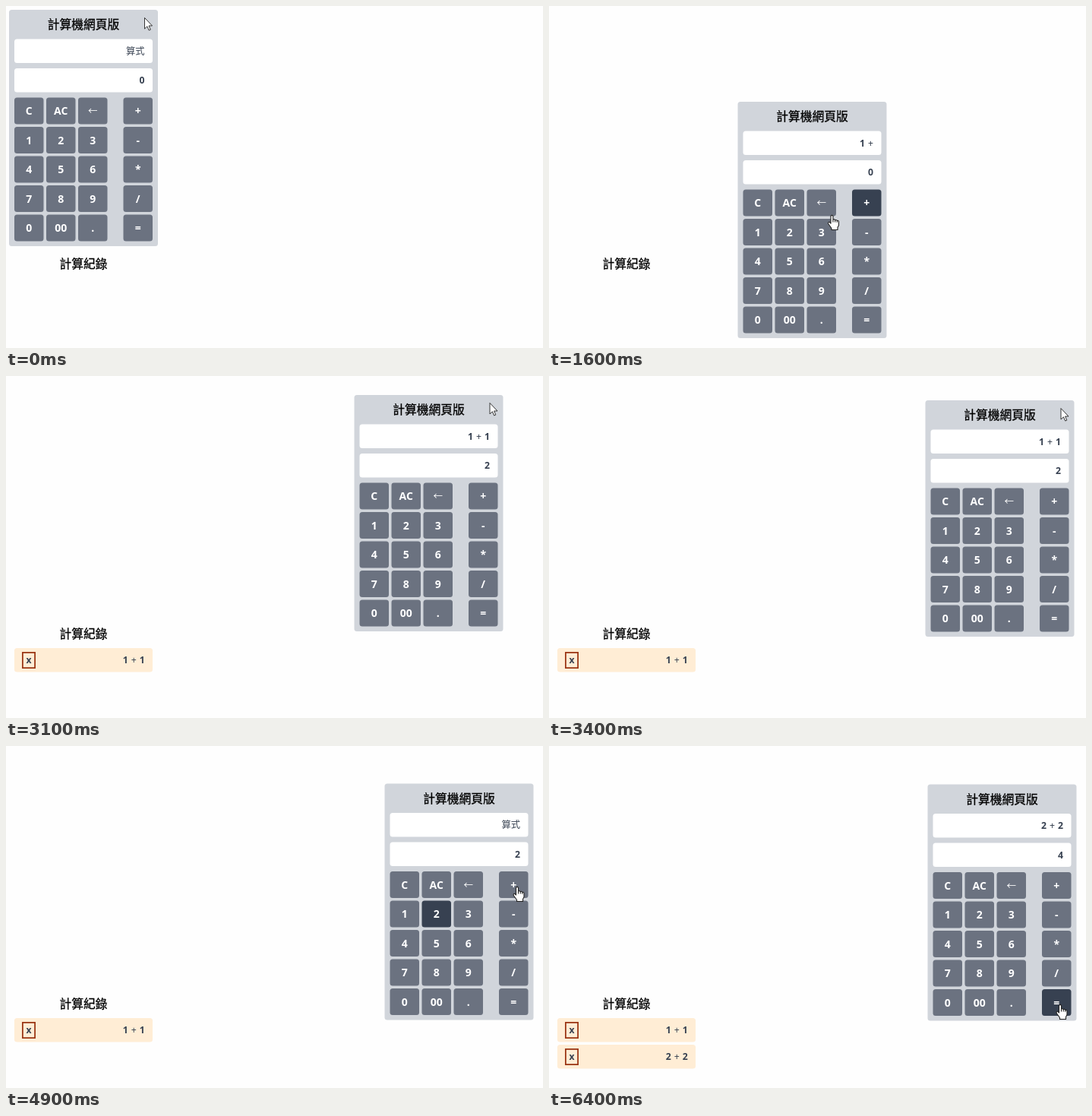
An HTML page for the animation above (6500 ms loop, 707x450 px).

```html
<!DOCTYPE html>
<html lang="zh-Hant">
<head>
<meta charset="utf-8">
<title>計算機</title>
<style>
  html, body { margin: 0; width: 100%; height: 100%; overflow: hidden; background: #fefefe; }
  svg { display: block; }
  text { font: 700 12.25px "Noto Sans", "Noto Sans CJK TC", sans-serif; fill: #374151; }
  .heading {
    font: 400 15.75px "Noto Sans CJK TC", "Noto Sans CJK", sans-serif;
    fill: #000; stroke: #000; stroke-width: .3px; text-anchor: middle;
  }
  .key { fill: #6b7280; }
  .key.focused { fill: #374151; }
  .label { font-size: 14px; fill: #fff; text-anchor: middle; }
  .back { font: 400 12.5px "Noto Sans CJK TC", "Noto Sans CJK", sans-serif; }
  .value { text-anchor: end; word-spacing: .8px; }
  .value .sign, .value .hint { font-weight: 400; }
  .pointer { fill: #fff; stroke: #222; stroke-linejoin: round; }
</style>
</head>
<body>
<svg id="stage" width="707" height="450" viewBox="0 0 707 450"></svg>
<script>
const LOOP = 6500, STEP = 100, TRAVEL = 250;
const KEYS = ['C', 'AC', '←', '+', ...'123-456*789/', '0', '00', '.', '='];
const KEYS_TOP = 115.5;
const GRIP = [178, 10], AIM = [24, 20];

// The panel is dragged to a place, or a key is pressed, at the given time.
const EVENTS = [
  { time: 0, panel: [4, 5] },
  { time: 400, panel: [251, 128] },
  { time: 700, panel: [248.5, 126] },
  { time: 1200, key: '1' },
  { time: 1500, key: '+' },
  { time: 1900, key: '1' },
  { time: 2300, key: '=' },
  { time: 2800 },
  { time: 3100, panel: [458.5, 25] },
  { time: 3250, panel: [490, 0] },
  { time: 3500, panel: [498.5, 49.5] },
  { time: 4000, key: 'AC' },
  { time: 4400, key: '2' },
  { time: 5100, key: '+' },
  { time: 5500, key: '2', panel: [498.5, 50.5] },
  { time: 6000, key: '=' }
];

const add = (...points) => [0, 1].map(axis => points.reduce((sum, point) => sum + point[axis], 0));

function keyPlace(key) {
  const index = KEYS.indexOf(key), column = index % 4, row = Math.floor(index / 4);
  return [7 + column * 42 + (column === 3 ? 17.5 : 0), KEYS_TOP + row * 38.5];
}

function press(state, key) {
  const { expression, result, records } = state;
  if (key === 'AC') return { expression: '', result: '0', records };
  if (key === '+') return { expression: `${result} +`, result: '0', records };
  if (key !== '=') return { expression, result: key, records };
  const full = `${expression} ${result}`;
  const total = full.split(' + ').reduce((sum, part) => sum + Number(part), 0);
  return { expression: full, result: String(total), records: [...records, full] };
}

const scenes = [];
for (const { time, key, panel } of EVENTS) {
  const last = scenes[scenes.length - 1] ??
    { time: 0, state: { expression: '', result: '0', records: [] } };
  const place = panel ?? last.panel;
  scenes.push({
    time, key,
    panel: place,
    pointer: add(place, ...(key ? [keyPlace(key), AIM] : [GRIP])),
    duration: key ? TRAVEL : time - last.time,
    state: key ? press(last.state, key) : last.state
  });
}

const box = (x, y, w, h, attrs) =>
  `<rect x="${x}" y="${y}" width="${w}" height="${h}" rx="3.5" ${attrs}/>`;

function keyMarkup(key) {
  const [x, y] = keyPlace(key);
  return box(x, y, 38.5, 35, `class="key" data-key="${key}"`) +
    `<text class="label ${key === '←' ? 'back' : ''}" x="${x + 19.25}" y="${y + 22.5}">${key}</text>`;
}

const formula = text => text.replace('+', '<tspan class="sign">+</tspan>');

const recordMarkup = (text, index) => `
  <g class="record" transform="translate(11 ${358 + index * 35})">
    ${box(0, 0, 182, 31.5, 'fill="#ffedd5"')}
    <rect x="10.9" y="5.9" width="16.2" height="20.2" fill="none" stroke="#9a3412" stroke-width="1.75"/>
    <text x="19" y="20" text-anchor="middle">x</text>
    <text class="value" x="171.7" y="20.2">${formula(text)}</text>
  </g>`;

const stage = document.getElementById('stage');
stage.innerHTML = `
  <text class="heading" x="102" y="344.5">計算紀錄</text>
  ${scenes[scenes.length - 1].state.records.map(recordMarkup).join('')}
  <g id="panel">
    ${box(0, 0, 196, 311, 'fill="#d1d5db"')}
    <text class="heading" x="98" y="25">計算機網頁版</text>
    ${box(7, 38.5, 182, 31.5, 'fill="#fff"')}
    ${box(7, 77, 182, 31.5, 'fill="#fff"')}
    <text class="value" id="expression" x="178.5" y="58.7"></text>
    <text class="value" id="result" x="178.5" y="97.2"></text>
    ${KEYS.map(keyMarkup).join('')}
  </g>
  <g id="pointer" class="pointer">
    <path id="arrow" stroke-width=".9" d="M.5 .5V15L3.9 11.8 6.2 17 8.3 16.1 6.1 11H10.5Z"/>
    <path id="hand" stroke-width="1.1" d="M-1.5 1.5Q0-.8 1.5 1.5V6Q3.2 5 4.2 6.7
      Q6 5.8 6.8 7.5Q9 6.8 9 9.2V13.5L7.5 16.5V19.5H-.5V17.5L-4.8 11.5Q-5.3 9-3.2 9.3L-1.5 11Z
      M1.5 6V9.5M4.2 6.7V9.5M6.8 7.5V9.7"/>
  </g>`;

const byId = id => document.getElementById(id);
const panelNode = byId('panel'), pointerNode = byId('pointer');
const arrow = byId('arrow'), hand = byId('hand');
const expressionText = byId('expression'), resultText = byId('result');
const keyBoxes = [...stage.querySelectorAll('.key')];
const recordNodes = [...stage.querySelectorAll('.record')];

const ease = p => p * p * (3 - 2 * p);
const mix = (from, to, amount) => from.map((value, axis) => value + (to[axis] - value) * amount);
const place = (node, [x, y]) => node.setAttribute('transform', `translate(${x} ${y})`);
const show = (node, visible) => node.setAttribute('visibility', visible ? 'visible' : 'hidden');

function render(time) {
  const current = scenes.filter(scene => scene.time <= time).pop();
  const next = scenes[scenes.indexOf(current) + 1] ?? current;
  const progress = next === current ? 0 : ease(Math.min(1, (time - current.time) / next.duration));
  const panel = mix(current.panel, next.panel, progress);
  const pointer = mix(current.pointer, next.pointer, progress);
  place(panelNode, panel);
  place(pointerNode, pointer);

  const overKeys = pointer[1] - panel[1] >= KEYS_TOP;
  show(hand, overKeys);
  show(arrow, !overKeys);

  const { expression, result, records } = current.state;
  expressionText.innerHTML = expression ? formula(expression) : '<tspan class="hint">算式</tspan>';
  resultText.textContent = result;
  keyBoxes.forEach(node => node.classList.toggle('focused', node.dataset.key === current.key));
  recordNodes.forEach((node, index) => show(node, index < records.length));
}

let start, shown = -1;
function tick(now) {
  start ??= now;
  const time = Math.floor((now - start) % LOOP / STEP) * STEP;
  if (time !== shown) render(shown = time);
  requestAnimationFrame(tick);
}
render(0);
requestAnimationFrame(tick);
</script>
</body>
</html>
```
